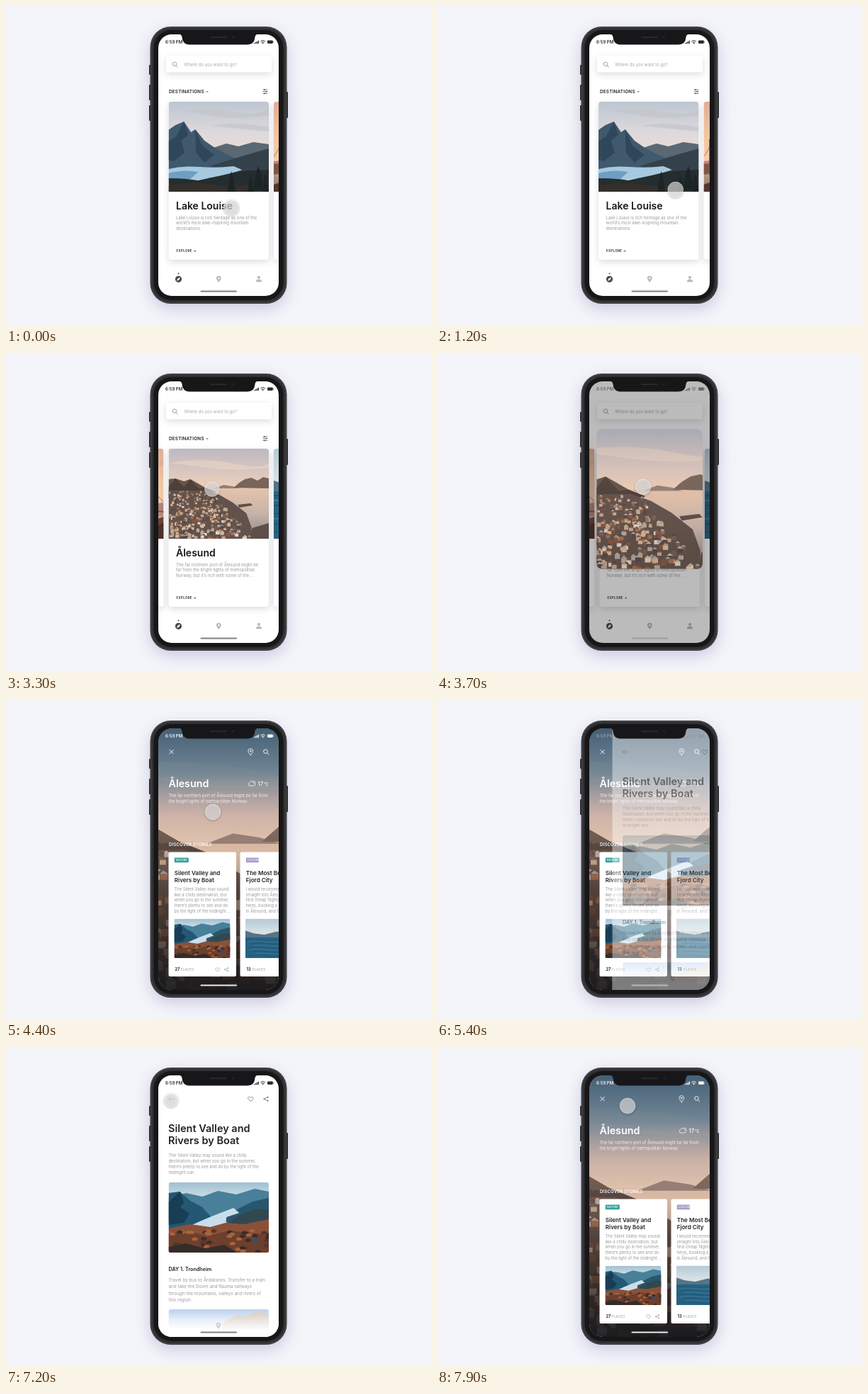
An HTML page that plays this animation: 600 px wide and 450 px high, repeating every 8000 ms.

```html
<!DOCTYPE html>
<html lang="en">
<head>
<meta charset="utf-8">
<title>Travel app</title>
<style>
  html, body { margin: 0; width: 100%; height: 100%; overflow: hidden; background: #f4f5fa; }
  svg { display: block; }
  #stage { width: 600px; height: 450px; }
  text { font-family: Inter, Roboto, sans-serif; white-space: pre; }
  .line { fill: none; stroke-linecap: round; stroke-linejoin: round; }
  .phone { filter: drop-shadow(0 7px 11px rgba(105, 100, 165, .3)); }
  .lift { filter: drop-shadow(0 3px 5px rgba(40, 40, 60, .16)); }
  #touch { filter: drop-shadow(0 1px 1.5px rgba(0, 0, 0, .4)); }
</style>
</head>
<body>
<svg id="stage" viewBox="0 0 600 450"></svg>
<script>
const DURATION = 8000, STEP = 100, PITCH = 148.5;
const CARD = { x: 229.5, y: 135, w: 141.5, h: 127 };
const SCREEN = { x: 215, y: 40, w: 170, h: 369 };
const INK = '#222326', GREY = '#9b9ba0', PALE = '#b9b9be';

let seed = 90210;
const random = () => (seed = seed * 16807 % 2147483647) / 2147483647;
const list = (n, make) => Array.from({ length: n }, (_, i) => make(i)).join('');

const text = (x, y, size, str, fill = INK, weight = 400, spacing = 0) =>
  `<text x="${x}" y="${y}" font-size="${size}" fill="${fill}" font-weight="${weight}" letter-spacing="${spacing}">${str}</text>`;
const lines = (x, y, leading, size, rows, fill = GREY, weight = 400) =>
  rows.map((row, i) => text(x, y + i * leading, size, row, fill, weight)).join('');
const rect = (x, y, w, h, fill, r = 0, extra = '') =>
  `<rect x="${x}" y="${y}" width="${w}" height="${h}" rx="${r}" fill="${fill}" ${extra}/>`;
const circle = (x, y, r, fill, extra = '') => `<circle cx="${x}" cy="${y}" r="${r}" fill="${fill}" ${extra}/>`;
const path = (d, fill, extra = '') => `<path d="${d}" fill="${fill}" ${extra}/>`;
const line = (d, color, width = .8) => `<path class="line" d="${d}" stroke="${color}" stroke-width="${width}"/>`;
const group = (id, body, extra = '') => `<g id="${id}" ${extra}>${body}</g>`;
const at = (x, y, body) => `<g transform="translate(${x} ${y})">${body}</g>`;
const gradient = (id, ...stops) =>
  `<linearGradient id="${id}" x2="0" y2="1">${stops.map(([o, c, a = 1]) =>
    `<stop offset="${o}" stop-color="${c}" stop-opacity="${a}"/>`).join('')}</linearGradient>`;
const photo = (id, h, body) =>
  `<symbol id="${id}" viewBox="0 0 142 ${h}" preserveAspectRatio="xMidYMid slice">${body}</symbol>`;
const picture = (name, x, y, w, h, extra = '') =>
  `<use href="#${name}" x="${x}" y="${y}" width="${w}" height="${h}" ${extra}/>`;
const clip = (id, shape) => `<clipPath id="${id}">${shape}</clipPath>`;

const icon = {
  search: (x, y, c, w = .9) => at(x, y, line('M-3.4 -.5a2.8 2.8 0 1 0 5.6 0a2.8 2.8 0 1 0 -5.6 0M1.5 1.6L3.9 4', c, w)),
  pin: (x, y, c) => at(x, y, line('M0 4.6C-2 1.9 -3.4 .5 -3.4 -1.2a3.4 3.4 0 0 1 6.8 0C3.4 .5 2 1.9 0 4.6z', c) + circle(0, -1.2, 1.1, 'none', `stroke="${c}" stroke-width=".8"`)),
  solidPin: (x, y, c) => at(x, y, path('M0 4.7C-2 2 -3.4 .5 -3.4 -1.2a3.4 3.4 0 0 1 6.8 0C3.4 .5 2 2 0 4.7zM0 -2.6a1.3 1.3 0 1 0 .01 0z', c, 'fill-rule="evenodd"')),
  heart: (x, y, c, s = 1) => at(x, y, `<g transform="scale(${s})">${line('M0 3.4L-3.2 .2C-4.7 -2.2 -1.7 -4.3 0 -1.9C1.7 -4.3 4.7 -2.2 3.2 .2z', c)}</g>`),
  share: (x, y, c, s = 1) => at(x, y, `<g transform="scale(${s})">${line('M2.4 -2.5L-2.5 0L2.4 2.5', c)}${circle(2.4, -2.5, 1.1, c)}${circle(-2.5, 0, 1.1, c)}${circle(2.4, 2.5, 1.1, c)}</g>`),
};

function bridge() {
  const red = '#9c4a37', deck = 87;
  const cableY = u => (1 - u) ** 2 * 53 + 2 * u * (1 - u) * 131 + u * u * 21;
  const cableX = u => (1 - u) ** 2 * 12 + 2 * u * (1 - u) * 48 + u * u * 107;
  const tower = (x, top, w, foot) => rect(x - w, top, w * .55, foot - top, red) + rect(x + w * .45, top, w * .55, foot - top, red) +
    list(5, i => rect(x - w, top + 1 + i * (deck - top) / 5, w * 2, w * .4, red));
  return line('M12 53Q48 131 107 21Q120 58 142 75M12 53Q7 70 0 78', red, .7) +
    list(30, i => line(`M${cableX(i / 30)} ${cableY(i / 30)}V${deck}`, red, .22)) +
    list(8, i => line(`M${111 + i * 4} ${32 + i * 6 - i * i * .05}V${deck}`, red, .22)) +
    line('M0 89Q72 82 142 89', red, 2.2) + tower(12, 53, 4, 104) + tower(107, 21, 5.5, 113);
}

function houses() {
  const tints = ['#e4d5c6', '#c9aa8e', '#a8704f', '#8c5540', '#d9b894', '#765f57', '#b6aaa5', '#54484a'];
  return list(260, i => {
    const y = 60 + 66 * (i / 260), near = (y - 56) / 70;
    const x = random() * (58 + near * 58), w = 1.5 + near * 3 + random() * 1.5;
    const roof = tints[Math.floor(random() * 3) + 5 - Math.floor(random() * 3)];
    return rect(x, y, w, w * .8, tints[Math.floor(random() * 8)]) + path(`M${x - .3} ${y}l${w / 2} ${-w * .45}l${w / 2 + .6} ${w * .45}z`, roof);
  });
}

const fir = (x, top, w) => list(6, i => path(`M${x} ${top + i * 5}l${w * (i + 2) / 8} 9h${-w * (i + 2) / 4}z`, '#1d2426'));

const photos =
  photo('lake', 127,
    rect(0, 0, 142, 127, 'url(#lakeSky)') +
    path('M20 14Q60 7 90 14T142 11V20Q90 26 60 20T20 14zM60 34Q95 27 142 36V42Q100 38 60 34z', '#c3c4cb', 'opacity=".65"') +
    path('M60 66L82 59L99 63L120 57L142 60V110H55z', '#5a6874') +
    path('M0 40L10 33L22 28L32 43L38 39L51 55L67 66L82 74L105 84L60 97H0z', '#40596c') +
    path('M22 28L28 47L18 55L23 72L8 84L0 82V56L11 49zM38 39L48 62L65 75L51 86L39 72z', '#2f475a') +
    path('M142 66L110 75L84 83L58 91L142 103z', '#34414a') +
    path('M0 95Q22 90 45 92T92 91L104 96L78 105L40 110H0z', '#a6c9e0') +
    path('M0 101Q20 95 42 99L30 110H0z', '#6e9fc2') +
    path('M0 108Q25 108 42 111L75 104L100 98L142 96V127H0z', '#252d2f') +
    path('M0 119Q30 111 62 117T142 111V127H0z', '#332f2b') +
    fir(89, 98, 10) + fir(127, 91, 13) + fir(116, 103, 8) + fir(137, 101, 9)) +
  photo('bridge', 127,
    rect(0, 0, 142, 127, 'url(#bridgeSky)') +
    path('M0 20Q40 13 75 21T142 15V23Q100 29 60 25T0 20z', '#d89d86', 'opacity=".35"') +
    path('M0 84L25 81L50 84L82 79L110 80L142 76V99H0z', '#b08a80') +
    rect(0, 95, 142, 32, 'url(#bay)') +
    path('M0 88L18 91L31 98L0 103z', '#7d5748') + bridge() +
    path('M142 96L130 100L121 112L112 127H142z', '#6c4436') + path('M142 104L132 109L125 127H142z', '#4d3129') +
    path('M0 117L12 113L24 119L40 116L54 122L75 119L91 124L110 120L125 127H0z', '#50362f')) +
  photo('harbour', 127,
    rect(0, 0, 142, 127, 'url(#harbourSky)') +
    path('M0 20Q50 12 92 21T142 20V27Q95 32 56 27T0 20z', '#f2d9c7', 'opacity=".5"') +
    rect(0, 55, 142, 72, 'url(#sea)') +
    path('M65 56L78 51L91 53L101 56z', '#968078') +
    path('M92 55L100 48L108 43L117 41L126 45L134 40L142 42V56z', '#786459') +
    path('M0 43L10 42L22 46L31 43L40 48L52 55L67 61L50 70H0z', '#665449') +
    path('M10 42L22 54L31 43L43 56L52 55L67 61L50 70H0V54z', '#4e413b') +
    path('M0 59L54 59L72 65L91 76L110 91L117 110L118 127H0z', '#62524b') + houses() +
    path('M98 79L116 77L119 80L100 83zM118 112L142 105V127H116z', '#5d4e4a')) +
  photo('fjord', 99,
    rect(0, 0, 142, 99, 'url(#fjordSky)') +
    path('M0 22L25 15L48 20L70 12L96 17L122 9L142 13V56H0z', '#487f99') +
    path('M0 15L16 13L31 26L48 35L62 51L45 66H0z', '#235773') +
    path('M142 22L119 27L103 35L81 47L84 63H142z', '#28566d') +
    path('M16 13L22 28L17 35L30 44L22 57L0 60V28z', '#183e55') +
    path('M27 63Q48 53 66 46T92 36L100 43L82 49L80 62Z', '#c9deeb') +
    path('M0 65L31 59L59 63L88 55L111 47L142 45V99H0z', '#8a5137') +
    path('M83 57L105 44L127 37L142 39V52L107 59z', '#324851') +
    path('M0 72L28 68L55 76L86 68L142 74V99H0z', '#6d3f2d') +
    list(44, () => { const x = random() * 142, y = 67 + random() * 30;
      return path(`M${x} ${y}l4 -2l5 2l-2 3h-6z`, ['#3b2d28', '#a8633d', '#54372c'][Math.floor(random() * 3)]); }) +
    path('M0 91L24 86L52 93L79 88L97 99H0z', '#352c29') +
    circle(122, 75, 1.2, '#182b3e') + path('M120 77h4l1 4l-1 6h-1l-1 -4l-1 4h-1z', '#24527d')) +
  photo('coast', 99,
    rect(0, 0, 142, 99, 'url(#coastSky)') +
    path('M0 30L22 37L48 40L80 32L110 38L142 30V55H0z', '#547487') +
    rect(0, 47, 142, 52, '#286383') +
    list(9, i => line(`M${i * 7 % 25} ${53 + i * 5}q20 -3 42 0t44 0t42 0`, i % 2 ? '#4f8ca8' : '#174d6c', .9)));

const defs = gradient('lakeSky', [0, '#bdc6d1'], [.35, '#ded9dc'], [.6, '#ecdcd2']) +
  gradient('bridgeSky', [0, '#dfad95'], [.35, '#f2c49f'], [.65, '#f3cfaf'], [1, '#dfae93']) +
  gradient('bay', [0, '#c7a18d'], [1, '#8c746a']) +
  gradient('harbourSky', [0, '#bdb9c1'], [.25, '#d9c6c0'], [.45, '#f1d1b8']) +
  gradient('sea', [0, '#e5c4ac'], [.5, '#c8b3a8'], [1, '#8d8587']) +
  gradient('fjordSky', [0, '#9ec0d3'], [.25, '#d5e2e6']) +
  gradient('coastSky', [0, '#b4cad7'], [.45, '#e3e8e7']) +
  gradient('paleSky', [0, '#bfd4ef'], [.7, '#e8eef7']) +
  gradient('shade', [0, '#3a586e', .92], [.18, '#506f84', .72], [.34, '#a4857e', .32], [.47, '#8c6c60', .1], [.62, '#30231f', .35], [.86, '#211b1a', .8], [1, '#15161a', .92]) +
  gradient('fade', [0, '#fff', 0], [.75, '#fff']) +
  clip('screenClip', rect(215, 40, 170, 369, '#fff', 19)) +
  clip('cardClip', rect(CARD.x, CARD.y, CARD.w, 223, '#fff', 4)) +
  clip('heroClip', '<rect id="heroRect"/>') +
  clip('fjordClip', rect(237.5, 308.5, 79, 55.5, '#fff', 2)) +
  clip('storyClip', rect(229.5, 191, 141.5, 99, '#fff', 3)) +
  clip('nextClip', rect(229.5, 370, 141.5, 50, '#fff', 3)) + photos;

const cards = [
  ['lake', 'Lake Louise', ['Lake Louise is rich heritage as one of the', 'world’s most awe-inspiring mountain', 'destinations.']],
  ['bridge', 'San Francisco', ['Grab your coat and a handful of glitter,', 'and enter the land of fog and', 'fabulousness.']],
  ['harbour', 'Ålesund', ['The far northern port of Ålesund might be', 'far from the bright lights of metropolitan', 'Norway, but it’s rich with some of the ...']],
  ['coast', 'Lofoten', ['Steep peaks, quiet bays and red cabins', 'along the edge of the sea.']],
];

const card = ([name, title, rows], i) => `<g transform="translate(${i * PITCH} 0)">
  ${rect(CARD.x, CARD.y, CARD.w, 223, '#fff', 4, 'class="lift"')}
  <g clip-path="url(#cardClip)">${picture(name, CARD.x, CARD.y, CARD.w, CARD.h)}</g>
  ${text(240, 287, 14, title, '#17181a', 600)}${lines(240, 300.5, 7.8, 5.9, rows)}
  ${text(240.5, 346.7, 4.4, 'EXPLORE →', INK, 600, .35)}</g>`;

const home = rect(215, 40, 170, 369, '#fff') +
  group('cards', cards.map(card).join('')) +
  rect(226, 70, 149, 23.5, '#fff', 2, 'class="lift"') + icon.search(238.5, 82.3, GREY) +
  text(251.5, 84.5, 6, 'Where do you want to go?', '#a9a9ae') +
  text(230, 123, 6.3, 'DESTINATIONS', INK, 600, .25) + path('M282 120h4l-2 2.4z', GREY) +
  line('M363 118H369M363 120.7H369M363 123.4H369', '#55565a', .8) + circle(365, 118, .9, '#55565a') + circle(367.4, 120.7, .9, '#55565a') + circle(365, 123.4, .9, '#55565a') +
  circle(243.5, 377.3, .9, INK) + circle(243.5, 385.3, 4.6, '#4a4b50') + path('M246 382.8l-1.5 3.5l-3.5 1.5l1.5 -3.5z', '#fff') +
  icon.solidPin(300.3, 385.3, PALE) + circle(357, 382.8, 2.1, PALE) + path('M352.9 389.2q0 -3.6 4.1 -3.6t4.1 3.6z', PALE);

const TITLE = ['Silent Valley and', 'Rivers by Boat'];
const storyCard = (x, tag, tagColor, tagWidth, title, rows, image, count) =>
  rect(x, 214.5, 95.5, 175.5, '#fff', 2) + rect(x + 8.3, 222.5, tagWidth, 6.7, tagColor, .6) +
  text(x + 10.3, 227.3, 3.8, tag, '#fff', 500, .1) + lines(x + 8.3, 247.3, 9.8, 8.1, title, INK, 600) +
  lines(x + 8, 268.8, 7.7, 5.8, rows) + image + text(x + 9, 382.2, 5.6, count, INK, 700) +
  text(x + 17, 382.2, 4.7, 'PLACES', GREY, 400, .15) + icon.heart(x + 69, 380.3, GREY, .8) + icon.share(x + 81.5, 380.2, GREY, .8);

const place = line('M230.8 70.3L236.4 75.9M236.4 70.3L230.8 75.9', '#fff', .9) + icon.pin(345.3, 73.2, '#fff') + icon.search(367, 73, '#fff') +
  text(229.5, 122.5, 14.3, 'Ålesund', '#fff', 600) +
  line('M344 121h5.5a2.1 2.1 0 0 0 0 -4.2a3 3 0 0 0 -5.7 -.4a2.4 2.4 0 0 0 .2 4.6M349 114.3a2.2 2.2 0 0 1 2.4 3', '#fff', .7) +
  text(355.5, 120.6, 7.6, '17', '#fff', 500) + text(364, 120.6, 5.6, '°C', '#fff', 500) +
  lines(229.5, 137.3, 8, 5.9, ['The far northern port of Ålesund might be far from', 'the bright lights of metropolitan Norway.'], '#f3eeee') +
  text(230, 206, 6, 'DISCOVER STORIES', '#fff', 600, .2) +
  storyCard(229.5, 'NATURE', '#36a29a', 20, TITLE,
    ['The Silent Valley may sound', 'like a chilly destination, but', 'when you go in the summer,', 'there’s plenty to see and do', 'by the light of the midnight ...'],
    `<g clip-path="url(#fjordClip)">${picture('fjord', 237.5, 308.5, 79, 55.5)}</g>`, '27') +
  storyCard(330.5, 'CULTURE', '#a59ccb', 18, ['The Most Beautiful', 'Fjord City'],
    ['I would recommend flying', 'straight into Ålesund. You', 'find cheap flights (see', 'here), booking a hotel', 'in Ålesund, and then'],
    picture('coast', 338, 308.5, 79, 55.5), '13');

const story = rect(215, 40, 170, 369, '#fff') +
  line('M237 73.3H229.8L232.8 70.3M229.8 73.3L232.8 76.3', GREY, .8) + icon.heart(345.3, 73.3, '#77787d') + icon.share(367, 73.3, '#77787d') +
  lines(229, 120, 17, 14.5, TITLE, INK, 600) +
  lines(229.5, 154.5, 8.15, 5.9, ['The Silent Valley may sound like a chilly', 'destination, but when you go in the summer,', 'there’s plenty to see and do by the light of the', 'midnight sun.']) +
  `<g clip-path="url(#storyClip)">${picture('fjord', 229.5, 191, 141.5, 99)}</g>` +
  text(229.5, 316, 7.2, 'DAY 1. Trondheim', INK, 600) +
  lines(229.5, 330.7, 9.5, 6.3, ['Travel by bus to Åndalsnes. Transfer to a train', 'and take the Dovre and Rauma railways', 'through the mountains, valleys and rivers of', 'this region.']) +
  `<g clip-path="url(#nextClip)">${rect(229.5, 370, 141.5, 40, 'url(#paleSky)')}${path('M310 386L326 377L340 379L354 373L371 377V400H300z', '#d9cfc5')}</g>` +
  rect(215, 374, 170, 35, 'url(#fade)') + icon.solidPin(300, 393.3, '#cfcfd3');

const status = text(225, 53, 6, '6:59 PM', 'currentColor', 600) +
  list(4, i => rect(350 + i * 1.9, 52 - i * 1.1, 1.3, 1.2 + i * 1.1, 'currentColor', .3)) +
  line('M359.6 49.9a4.4 4.4 0 0 1 6 0M361 51.4a2.4 2.4 0 0 1 3.2 0', 'currentColor', 1) + circle(362.6, 52.7, .8, 'currentColor') +
  rect(369, 48.5, 7.8, 4.4, 'currentColor', 1.1) + rect(377.3, 49.9, .8, 1.6, 'currentColor', .3);

const button = (x, y, h) => rect(x, y, 3, h, '#29292b', 1);

document.getElementById('stage').innerHTML = `<defs>${defs}</defs>` +
  rect(0, 0, 600, 450, '#f4f5fa') +
  `<g class="phone">${button(202, 83, 14)}${button(202, 111, 22)}${button(202, 140, 22)}${button(395, 121, 37)}
    ${rect(203.5, 29, 193, 391, '#39393b', 29)}</g>` +
  rect(205, 30.5, 190, 388, '#303032', 27.5, 'stroke="#48484a" stroke-width="1"') +
  rect(208.5, 34, 183, 381, '#171719', 25) +
  `<g clip-path="url(#screenClip)">` + group('home', home) +
  group('hero', picture('harbour', 0, 0, 1, 1, 'id="heroPhoto"') + rect(215, 40, 170, 369, 'url(#shade)', 0, 'id="heroShade"'), 'clip-path="url(#heroClip)"') +
  group('place', place) + group('story', story) + group('status', status) +
  rect(274.5, 401.6, 51.5, 1.9, '#808084', .95, 'id="bar"') + `</g>` +
  path('M243 39.5q5 0 5.5 4.5q.8 10.5 10.5 10.5H341q9.7 0 10.5 -10.5q.5 -4.5 5.5 -4.5z', '#171719') +
  rect(288, 43.3, 24, 1.9, '#2b2b2e', 1) + circle(320.5, 44, 1.4, '#23273a') +
  circle(0, 0, 11, '#f0f0f0', 'id="touch" fill-opacity=".62" stroke="#fff" stroke-opacity=".5" stroke-width=".7"');

const node = Object.fromEntries([...document.querySelectorAll('#stage [id]')].map(n => [n.id, n]));
const set = (n, attrs) => { for (const key in attrs) n.setAttribute(key, attrs[key]); };
const clamp = v => Math.max(0, Math.min(1, v));
const mix = (a, b, p) => a + (b - a) * p;
const ramp = (t, from, to) => { const p = clamp((t - from) / (to - from)); return p * p * (3 - 2 * p); };

// time, x, y of the finger
const touchPath = [
  [0, 318, 284], [500, 344, 262], [1100, 344, 260], [1700, 246, 248], [2100, 236, 247], [2400, 340, 234],
  [2850, 258, 212], [3300, 291, 192], [3600, 291, 190], [4400, 292, 158], [5000, 285, 277], [5600, 285, 277],
  [7000, 233, 75], [7300, 233, 75], [7900, 269, 83],
];
const taps = [3450, 5150, 7250];

function touchAt(t) {
  const i = Math.max(1, touchPath.findIndex(k => k[0] >= t));
  const a = touchPath[i - 1], b = touchPath[i], p = ramp(t, a[0], b[0]);
  return [mix(a[1], b[1], p), mix(a[2], b[2], p)];
}

function draw(t) {
  const swipe = ramp(t, 1150, 2000) + ramp(t, 2400, 3050);
  const open = ramp(t, 3450, 4150);
  const read = ramp(t, 5150, 5680) * (1 - ramp(t, 7250, 7750));
  const placed = clamp((open - .45) / .55);

  set(node.cards, { transform: `translate(${-swipe * PITCH} 0)` });
  set(node.home, { opacity: 1 - open });

  const box = { x: mix(CARD.x, SCREEN.x, open), y: mix(CARD.y, SCREEN.y, open),
    width: mix(CARD.w, SCREEN.w, open), height: mix(CARD.h, SCREEN.h, open) };
  set(node.heroPhoto, box);
  set(node.heroRect, { ...box, rx: mix(4, 19, open) });
  set(node.heroShade, { opacity: open });
  set(node.hero, { opacity: open > 0 ? 1 : 0 });

  set(node.place, { opacity: placed, transform: `translate(0 ${24 * (1 - placed)})` });
  set(node.story, { opacity: read * mix(.85, 1, read), transform: `translate(${60 * (1 - read)} 0)` });

  const light = open * (1 - read);
  const tone = (dark, bright) => { const v = Math.round(mix(dark, bright, light)); return `rgb(${v},${v},${v})`; };
  set(node.status, { color: tone(45, 245) });
  set(node.bar, { fill: tone(128, 235) });

  const [x, y] = touchAt(t);
  const press = Math.max(...taps.map(tap => 1 - clamp(Math.abs(t - tap) / 200)));
  set(node.touch, { cx: x, cy: y, r: 11 - 1.6 * press, opacity: 1 - .6 * ramp(t, 5200, 5400) * (1 - ramp(t, 5700, 6100)) });
}

const start = performance.now();
function tick() {
  const t = (performance.now() - start) % DURATION;
  draw(Math.floor(t / STEP) * STEP);
  requestAnimationFrame(tick);
}
tick();
</script>
</body>
</html>
```
